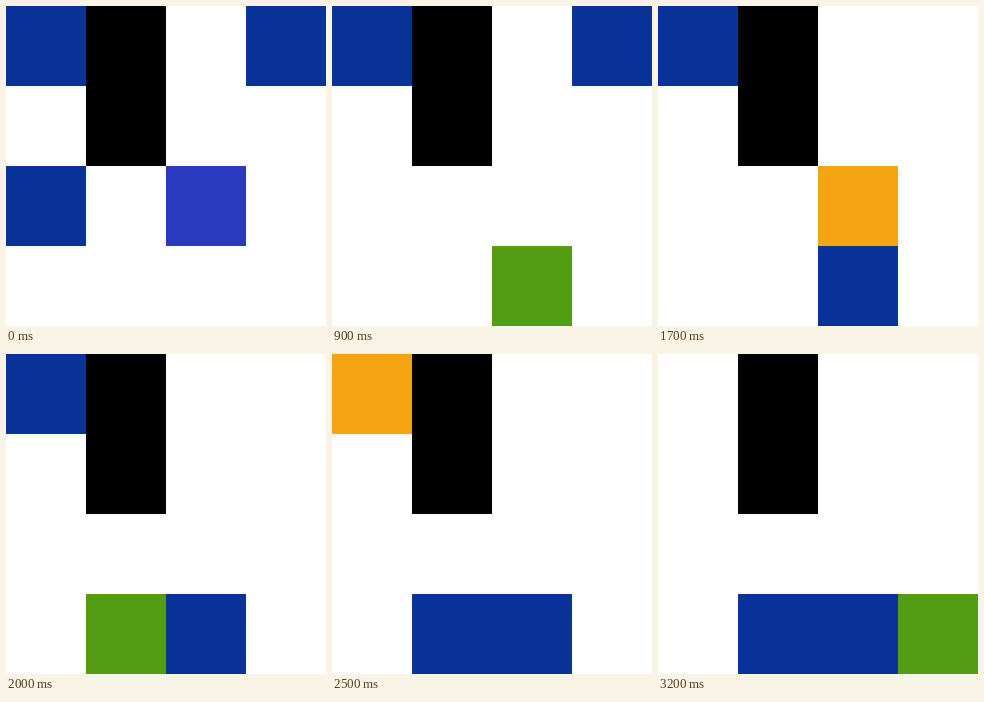
Recreate the animation shown at these times as an HTML page with a canvas. Size 400 by 400 pixels, loop 3500 ms.

```html
<!DOCTYPE html>
<html lang="en">
<head>
<meta charset="utf-8">
<title>Grid carrier</title>
<style>
  html, body { margin: 0; width: 100%; height: 100%; overflow: hidden; background: #fff; }
  canvas { display: block; width: 400px; height: 400px; }
</style>
</head>
<body>
<canvas id="stage" width="400" height="400"></canvas>
<script>
const ctx = document.getElementById('stage').getContext('2d');
const CELL = 100, LOOP = 3500, HOLD = 300, STEP = 100;
const COLOR = { wall: '#000', box: '#0a339a', free: '#2b38c0', carry: '#f4a412', drop: '#539d13' };
const WALLS = [[1, 0], [1, 1]];
const BOXES = [[0, 0], [3, 0], [0, 2]];
const MOVES = { l: [-1, 0], r: [1, 0], u: [0, -1], d: [0, 1] };
// + lifts the box under the agent, - puts it down
const PLAN = 'll+' + 'rrd-' + 'uruu+' + 'ddlld-' + 'uluu+' + 'ddrrrd-';

function stateAfter(count) {
  let x = 2, y = 2, color = COLOR.free;
  let boxes = BOXES;
  let carrying = false;
  for (const action of PLAN.slice(0, count)) {
    if (action === '+') {
      boxes = boxes.filter(([bx, by]) => bx !== x || by !== y);
      carrying = true;
      color = COLOR.carry;
    } else if (action === '-') {
      boxes = [...boxes, [x, y]];
      carrying = false;
      color = COLOR.drop;
    } else {
      x += MOVES[action][0];
      y += MOVES[action][1];
      color = carrying ? COLOR.carry : COLOR.free;
    }
  }
  return { x, y, color, boxes };
}

function fillCell(x, y, color) {
  ctx.fillStyle = color;
  ctx.fillRect(x * CELL, y * CELL, CELL, CELL);
}

function draw(now) {
  const t = now % LOOP;
  const count = t < HOLD ? 0 : Math.min(PLAN.length, 1 + Math.floor((t - HOLD) / STEP));
  const { x, y, color, boxes } = stateAfter(count);
  ctx.clearRect(0, 0, 400, 400);
  WALLS.forEach(([wx, wy]) => fillCell(wx, wy, COLOR.wall));
  boxes.forEach(([bx, by]) => fillCell(bx, by, COLOR.box));
  fillCell(x, y, color);
}

const start = performance.now();
function tick() {
  draw(performance.now() - start);
  requestAnimationFrame(tick);
}
tick();
</script>
</body>
</html>
```
